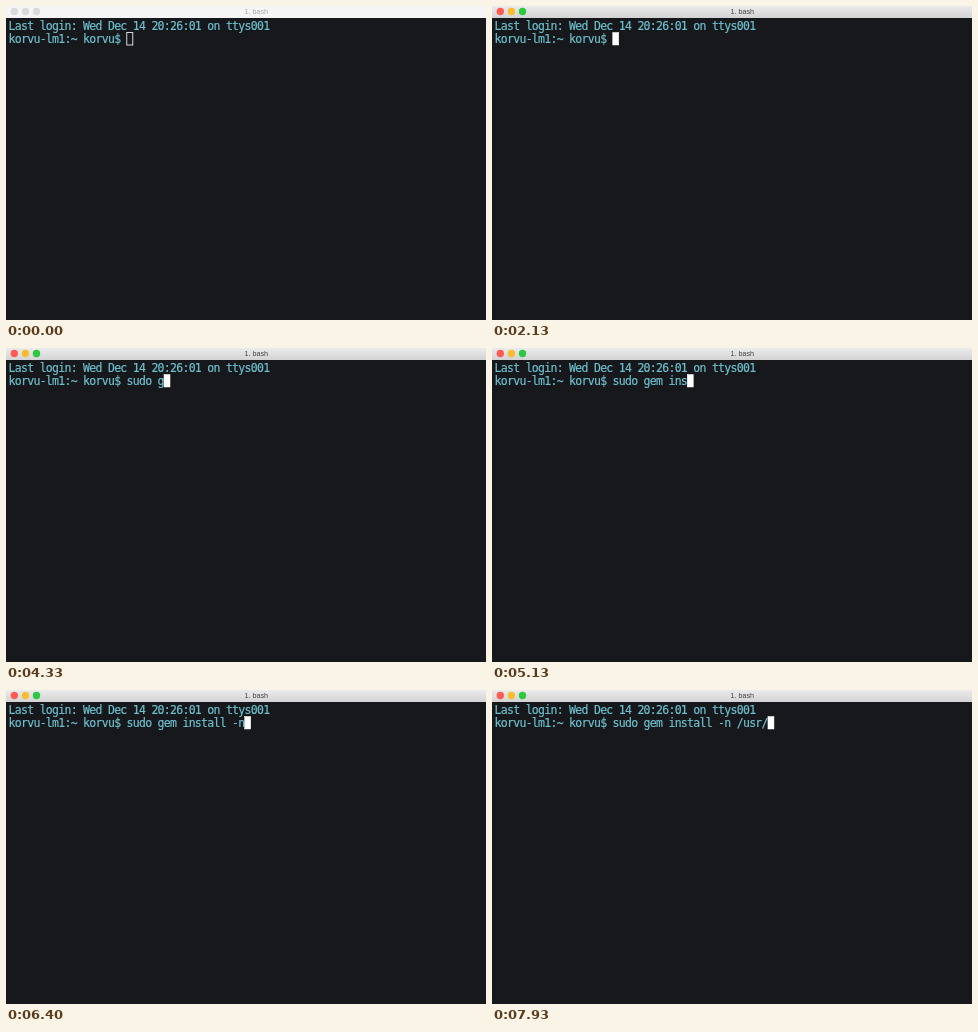
These frames come from a looping animation (480x314 px, 8 s). An HTML page:

```html
<!DOCTYPE html>
<html lang="en">
<head>
<meta charset="utf-8">
<title>Terminal</title>
<style>
  html, body { margin: 0; width: 100%; height: 100%; overflow: hidden; background: #17181c; }
  svg { display: block; width: 100%; height: 100%; }
  .line {
    font: 11.5px "DejaVu Sans Mono", monospace;
    letter-spacing: -0.715px;
    white-space: pre;
    fill: #6dc1cf;
    stroke: #6dc1cf;
    stroke-width: 0.2px;
  }
  #title { font: 7.2px "Liberation Sans", Arial, sans-serif; text-anchor: middle; }
</style>
</head>
<body>
<svg viewBox="0 0 480 314">
  <defs>
    <linearGradient id="activeBar" x2="0" y2="1">
      <stop offset="0" stop-color="#ebebeb"/>
      <stop offset="1" stop-color="#d3d3d3"/>
    </linearGradient>
  </defs>
  <rect width="480" height="314" fill="#17181c"/>
  <rect id="bar" width="480" height="12"/>
  <g id="buttons">
    <circle cx="8.3" cy="5.5" r="3.7"/>
    <circle cx="19.4" cy="5.5" r="3.7"/>
    <circle cx="30.5" cy="5.5" r="3.7"/>
  </g>
  <text id="title" x="250.3" y="8.4">1. bash</text>
  <text class="line" x="2.6" y="24">Last login: Wed Dec 14 20:26:01 on ttys001</text>
  <text class="line" id="prompt" x="2.6" y="37"></text>
  <rect id="cursor" y="26.5" width="6" height="12.5"/>
</svg>
<script>
const LOOP = 8000;
const FOCUS_AT = 1130;
const CELL = 6.208;
const PROMPT = "korvu-lm1:~ korvu$ ";
const COMMAND = "sudo gem install -n /usr/";
const BUTTON_COLORS = ["#ff5b52", "#fdbc2f", "#2bc840"];

// [time in ms, characters typed]
const TYPING = [[3400, 0], [5100, 12], [6300, 19], [6870, 20], [7140, 20], [7900, 25]];

const byId = id => document.getElementById(id);
const [bar, title, prompt, cursor] = ["bar", "title", "prompt", "cursor"].map(byId);
const buttons = [...byId("buttons").children];

function typedCount(t) {
  if (t <= TYPING[0][0]) return 0;
  for (let i = 1; i < TYPING.length; i++) {
    const [t0, n0] = TYPING[i - 1];
    const [t1, n1] = TYPING[i];
    if (t < t1) return Math.floor(n0 + (n1 - n0) * (t - t0) / (t1 - t0));
  }
  return COMMAND.length;
}

function render(t) {
  const focused = t >= FOCUS_AT;
  bar.setAttribute("fill", focused ? "url(#activeBar)" : "#f5f5f5");
  title.setAttribute("fill", focused ? "#444" : "#aaa");
  buttons.forEach((button, i) => button.setAttribute("fill", focused ? BUTTON_COLORS[i] : "#dadada"));

  const text = PROMPT + COMMAND.slice(0, typedCount(t));
  prompt.textContent = text;
  cursor.setAttribute("x", 2.8 + text.length * CELL);
  cursor.setAttribute("fill", focused ? "#fff" : "none");
  cursor.setAttribute("stroke", focused ? "#fff" : "#d8d8d8");
  cursor.setAttribute("stroke-width", focused ? 0.5 : 1);
}

const start = performance.now();
function tick() {
  render((performance.now() - start) % LOOP);
  requestAnimationFrame(tick);
}
tick();
</script>
</body>
</html>
```
